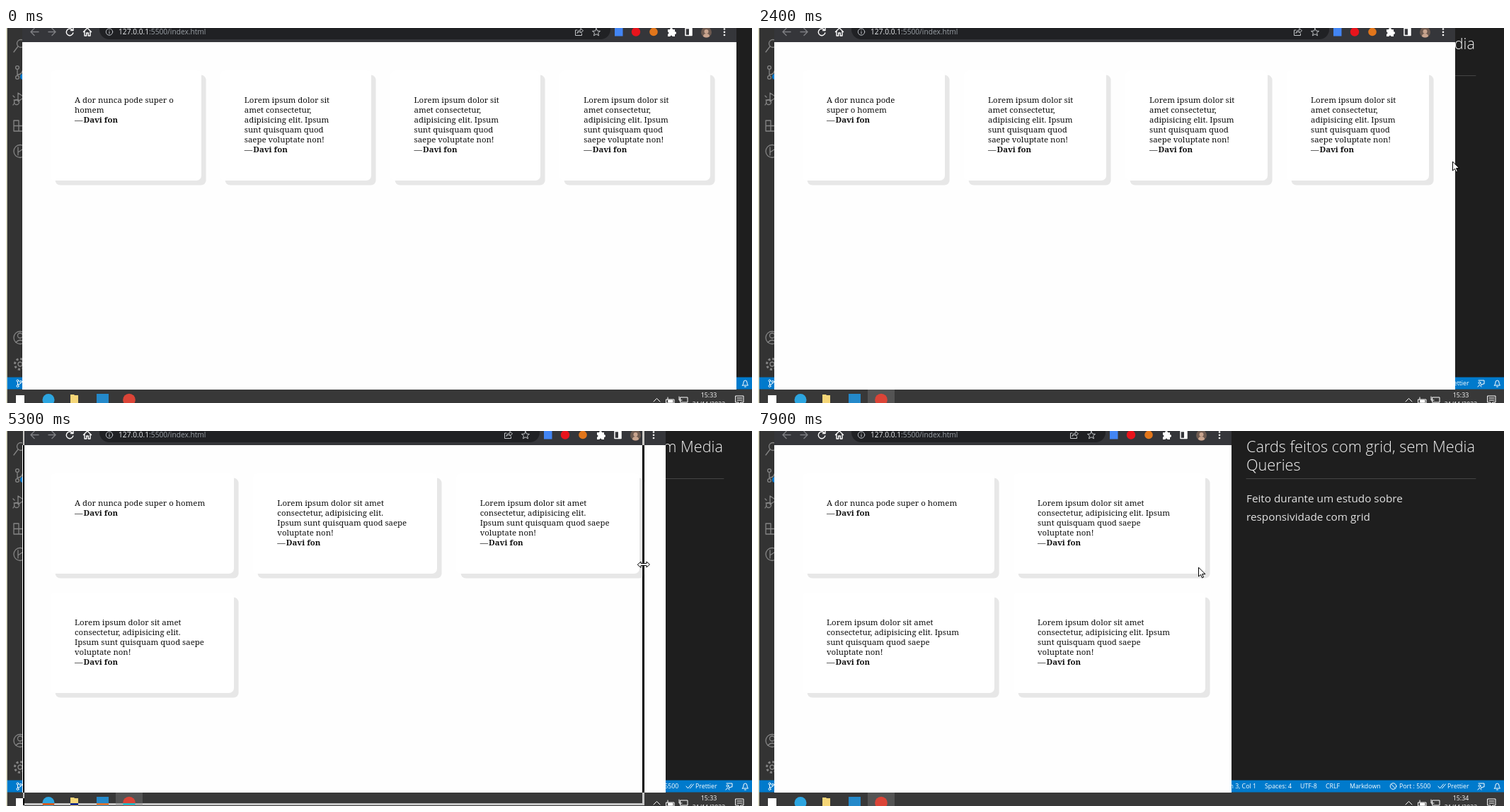
Animation, 1054 px wide and 531 px high, one loop 8 s. Source, as an HTML page:

```html
<!DOCTYPE html>
<html lang="pt">
<head>
<meta charset="utf-8">
<title>Cards</title>
<style>
html, body { margin: 0; width: 100%; height: 100%; overflow: hidden; background: #1e1e1e; }
body { position: relative; font-family: "Open Sans", sans-serif; }
svg { position: absolute; display: block; fill: none; stroke-linecap: round; stroke-linejoin: round; }
text { stroke: none; white-space: pre; }
#win { position: absolute; left: 23px; top: 0; height: 512px; background: #fefefe; overflow: hidden; }
#bar { position: absolute; inset: 0 0 auto; height: 20px; background: #35363a; }
#pill { position: absolute; left: 109px; right: 178px; top: -12px; height: 28px; border-radius: 14px; background: #202124; }
#tools { right: 0; top: 0; }
#cards { position: absolute; left: 40px; right: 37px; top: 60px; display: grid; gap: 27px; }
.card { padding: 34.6px 0 37.4px 34px; background: #fff; border-radius: 7px; box-shadow: 6.6px 6.6px #e7e7e7;
  font: 11.4px/14px "Noto Serif", serif; color: #111; white-space: pre; }
.card b { position: absolute; margin-left: 1px; }
#frame { position: absolute; left: 24px; top: -10px; height: 534px; border: 3px solid #fff; border-left-width: 2px;
  mix-blend-mode: difference; }
#pointer { left: 0; top: 0; }
</style>
</head>
<body>
<svg width="1054" height="531" stroke="#858585" stroke-width="1.3">
  <path fill="#1e1e1e" stroke="none" d="M0 0h1054v495H0z"/>
  <path fill="#333" stroke="none" d="M0 0h24v495H0z"/>
  <g stroke="none">
    <g font-size="21.7" font-weight="300" fill="#f4f4f4">
      <text x="690" y="29.5">Cards feitos com grid, sem Media</text>
      <text x="690" y="56">Queries</text>
    </g>
    <g font-size="15.3" fill="#e2e2e2">
      <text x="690" y="101">Feito durante um estudo sobre</text>
      <text x="690" y="127">responsividade com grid</text>
    </g>
  </g>
  <path d="M690 67.5h324" stroke="#444" stroke-width="1"/>

  <!-- activity bar -->
  <circle cx="21" cy="22" r="5.5"/><path d="M17 26l-6 8"/>
  <circle cx="16" cy="56" r="2.4"/><circle cx="16" cy="70" r="2.4"/><path d="M16 59v8M16 66q6 0 7-5"/>
  <circle cx="24" cy="69" r="4" fill="#007acc" stroke="none"/>
  <path d="M17 92l9 6-9 6zM11 102h7M12 98l-2-2M12 106l-2 3"/><circle cx="15" cy="105" r="3.5"/>
  <path d="M11 131h7v15h-7zM11 138.500h14M18 146h8v-8"/>
  <circle cx="20" cy="174.500" r="9"/><path d="M17 169v11M17 176l6-4"/>
  <circle cx="20" cy="438.500" r="9"/><circle cx="20" cy="435.500" r="3.5"/><path d="M14 445q6-6 12 0"/>
  <circle cx="20" cy="476" r="3"/><circle cx="20" cy="476" r="7.500" stroke-width="3" stroke-dasharray="3 2.900" stroke-linecap="butt"/>

  <!-- status bar -->
  <path fill="#007acc" stroke="none" d="M0 494.500h1054v18H0z"/>
  <g stroke="#fff" stroke-width="1">
    <circle cx="16.500" cy="499.500" r="1.500"/><circle cx="16.500" cy="507" r="1.500"/><circle cx="21" cy="501" r="1.500"/>
    <path d="M16.500 501v4.500M21 502.500q0 2-4 2.500"/>
    <circle cx="897.500" cy="503" r="4.300"/><path d="M894.500 500l6 6"/>
    <path d="M961 503l2.500 3 5-6M966.500 506l5-6"/>
    <path d="M1018 499h8v5h-2l-2 2v-2"/><circle cx="1019.500" cy="502.500" r="1.500"/><path d="M1017 508q2.500-5 5 0"/>
    <path d="M1040.500 506h8q-1.500-1.500-1.500-4a2.500 3 0 0 0-5 0q0 2.500-1.500 4zM1043.500 508h2"/>
  </g>
  <g fill="#fff" font-size="8.8">
    <text x="704" y="506" text-anchor="end">Ln 3, Col 1</text>
    <text x="716" y="506">Spaces: 4</text>
    <text x="766" y="506">UTF-8</text>
    <text x="802" y="506">CRLF</text>
    <text x="836" y="506">Markdown</text>
    <text x="906" y="506">Port : 5500</text>
    <text x="974" y="506">Prettier</text>
  </g>

  <!-- taskbar -->
  <path fill="#383838" stroke="none" d="M0 511.500h1054V531H0z"/>
  <path id="active" fill="#545454" stroke="none" d="M155 512h38v19h-38z"/>
  <g stroke="none">
    <path fill="#fff" d="M14 520h12v12H14z"/>
    <circle cx="60" cy="526.500" r="8.500" fill="#2ca5e0"/>
    <path fill="#f5d678" d="M91 519h5l1 1h5v12H91z"/>
    <path fill="#2489ca" d="M128 518h17v14h-17z"/>
    <circle cx="174" cy="526.500" r="8.800" fill="#db4437"/>
    <g fill="#fff" font-size="8.8">
      <text id="clock" x="993" y="523" text-anchor="middle"></text>
      <text x="993" y="535.500" text-anchor="middle">21/11/2022</text>
    </g>
  </g>
  <g stroke="#fff" stroke-width="1">
    <path d="M915 529l4.500-4.500 4.500 4.500M933 526h11v5h-11zM935 523v3"/>
    <path fill="#fff" d="M936 527h6v3h-6z"/>
    <path d="M953 523h10v7h-10zM951 522v5h4M956 532h5"/>
    <path d="M1031 521h11v9h-4l-3 3v-3h-4zM1033 524h7M1033 527h7"/>
  </g>
  <path fill="#ecebd3" stroke="none" d="M0 0h1.700v531H0z"/>
</svg>

<div id="win">
  <div id="bar">
    <div id="pill"></div>
    <svg width="300" height="20" viewBox="23 0 300 20" stroke="#fff" stroke-width="1.400">
      <g stroke="#7d7e82"><path d="M46 5.500H35M40 .5l-5 5 5 5M60 5.500h10M65 .5l5 5-5 5"/></g>
      <path d="M94 3a4.800 4.800 0 1 0 .8 4M95 0v3.500h-3.500"/>
      <path d="M109.500 5.500L115 0l5.500 5.500M111 5v6h2.700V7h2.600v4h2.700V5"/>
      <g stroke="#bdc1c6" stroke-width="1"><circle cx="146" cy="5.500" r="4.700"/><path d="M146 5v3M146 3v.1"/></g>
      <text x="159" y="9.200" font-size="10.200" fill="#e8eaed">127.0.0.1<tspan fill="#9aa0a6">:5500/index.html</tspan></text>
    </svg>
    <svg id="tools" width="230" height="20" viewBox="802 0 230 20" stroke="#c4c7ca">
      <path d="M807 3h-2.500v7.500h9V8M807 7q1-4 5-4V.5l3.500 3.500-3.500 3V5q-3 0-5 2z"/>
      <path d="M834 .5l1.600 3.600 3.900.3-3 2.500 1 3.900-3.500-2.100-3.500 2.100 1-3.900-3-2.500 3.900-.3z"/>
      <g stroke="none">
        <path fill="#4285f4" d="M860 0h11.500v11.500H860z"/>
        <circle cx="890" cy="5.500" r="6.200" fill="#e8141c"/>
        <circle cx="915" cy="5.500" r="5.800" fill="#e2761b"/>
        <path fill="#fff" d="M935 2h3a2 2 0 0 1 4 0h3v3a2 2 0 0 1 0 4v3h-3.500a1.500 1.500 0 0 0-3 0H935V8.500a1.500 1.500 0 0 0 0-3z"/>
        <circle cx="989.500" cy="6" r="7.500" fill="#6d5a50"/>
        <path fill="#c9a48e" d="M985 12q0-4 4.500-4t4.500 4q-4.500 3-9 0z"/><circle cx="989.500" cy="5" r="3" fill="#c9a48e"/>
        <g fill="#fff"><circle cx="1015" cy="1.500" r="1.300"/><circle cx="1015" cy="5.800" r="1.300"/><circle cx="1015" cy="10" r="1.300"/></g>
      </g>
      <path d="M960 .5h9v10h-9z" stroke="#fff" stroke-width="1.500"/><path d="M967 .5v10" stroke="#fff" stroke-width="4" stroke-linecap="butt"/>
    </svg>
  </div>
  <div id="cards"></div>
</div>

<div id="frame"></div>
<svg id="pointer" width="1054" height="531" stroke="#000" fill="#fff" stroke-linejoin="miter">
  <path id="arrow" style="fill:#fff" d="M.5.500v12.500l3-2.700 2 4.600 2-.9-2-4.400h4z"/>
  <path id="resize" style="fill:#fff" d="M-8.500 0l4.500-4v2.500h8V-4l4.500 4-4.500 4V1.500h-8V4z"/>
</svg>

<script>
const $ = id => document.getElementById(id);
const LOOP = 8000, STEP = 100, GAP = 27, MIN = 190, FULL = 1032, AUTHOR = "Davi fon";

// [start of drag, release, window edge after release]
const drags = [[1700, 2400, 985], [4000, 4400, 932], [5300, 5400, 889], [5800, 6100, 820],
  [6400, 6600, 744], [7000, 7300, 669]];

// [card width below which the wrapping applies, wrapped text]
const shortQuote = [[206, "A dor nunca pode|super o homem"], [256, "A dor nunca pode super o|homem"],
  [999, "A dor nunca pode super o homem"]];
const longQuote = [
  [218, "Lorem ipsum dolor sit|amet consectetur,|adipisicing elit. Ipsum|sunt quisquam quod|saepe voluptate non!"],
  [223, "Lorem ipsum dolor sit|amet consectetur,|adipisicing elit. Ipsum sunt|quisquam quod saepe|voluptate non!"],
  [256, "Lorem ipsum dolor sit amet|consectetur, adipisicing elit.|Ipsum sunt quisquam quod|saepe voluptate non!"],
  [261, "Lorem ipsum dolor sit amet|consectetur, adipisicing elit.|Ipsum sunt quisquam quod saepe|voluptate non!"],
  [999, "Lorem ipsum dolor sit amet|consectetur, adipisicing elit. Ipsum|sunt quisquam quod saepe|voluptate non!"]];

const card = (quote, width) => {
  const text = quote.find(([max]) => width < max)[1].replaceAll("|", "\n");
  return `<div class="card">${text}\n—<b>${AUTHOR}</b></div>`;
};

let shown;
function layout(edge) {
  if (edge === shown) return;
  shown = edge;
  const inner = edge - 100;
  const cols = Math.floor((inner + GAP) / (MIN + GAP));
  const width = (inner - GAP * (cols - 1)) / cols;
  $("win").style.width = edge - 23 + "px";
  $("cards").style.gridTemplateColumns = `repeat(${cols}, 1fr)`;
  $("cards").innerHTML = [shortQuote, longQuote, longQuote, longQuote].map(q => card(q, width)).join("");
}

const part = (t, from, to) => Math.min(1, Math.max(0, (t - from) / (to - from)));

// Eases out; the shorter the drag, the stronger.
function dragged(t, edge, [start, end, to]) {
  const p = part(t, start - STEP, end);
  return edge + (to - edge) * (1 - (1 - p) ** (1 + STEP / (end - start)));
}

function arrowAt(t, edge) {
  if (t < 1400) {
    const p = part(t, 100, 1000);
    return [30 + 990 * p, 197 * p + 560 * p * (1 - p)];
  }
  const p = part(t, 7700, 7900);
  return [edge - 4 - 43 * p, 189 + 4 * p];
}

const show = (id, on) => { $(id).style.display = on ? "" : "none"; };

function draw(now) {
  const t = Math.floor(now % LOOP / STEP) * STEP;
  const edge = drags.reduce((e, [, end, to]) => t >= end ? to : e, FULL);
  const drag = drags.find(([start, end]) => t >= start && t < end);
  const line = drag ? dragged(t, edge, drag) : edge;
  layout(edge);

  show("frame", drag);
  $("frame").style.width = Math.round(line) - 27 + "px";

  const sizing = t >= 1400 && t < 2400 || t >= 3700 && t < 7500;
  const [x, y] = sizing ? [line + 1, 189] : arrowAt(t, edge);
  show("resize", sizing);
  show("arrow", !sizing && t >= 100);
  $(sizing ? "resize" : "arrow").setAttribute("transform", `translate(${Math.round(x)} ${Math.round(y)})`);

  show("active", t >= 1700);
  $("clock").textContent = t < 7800 ? "15:33" : "15:34";
  requestAnimationFrame(() => draw(performance.now()));
}
draw(performance.now());
</script>
</body>
</html>
```
